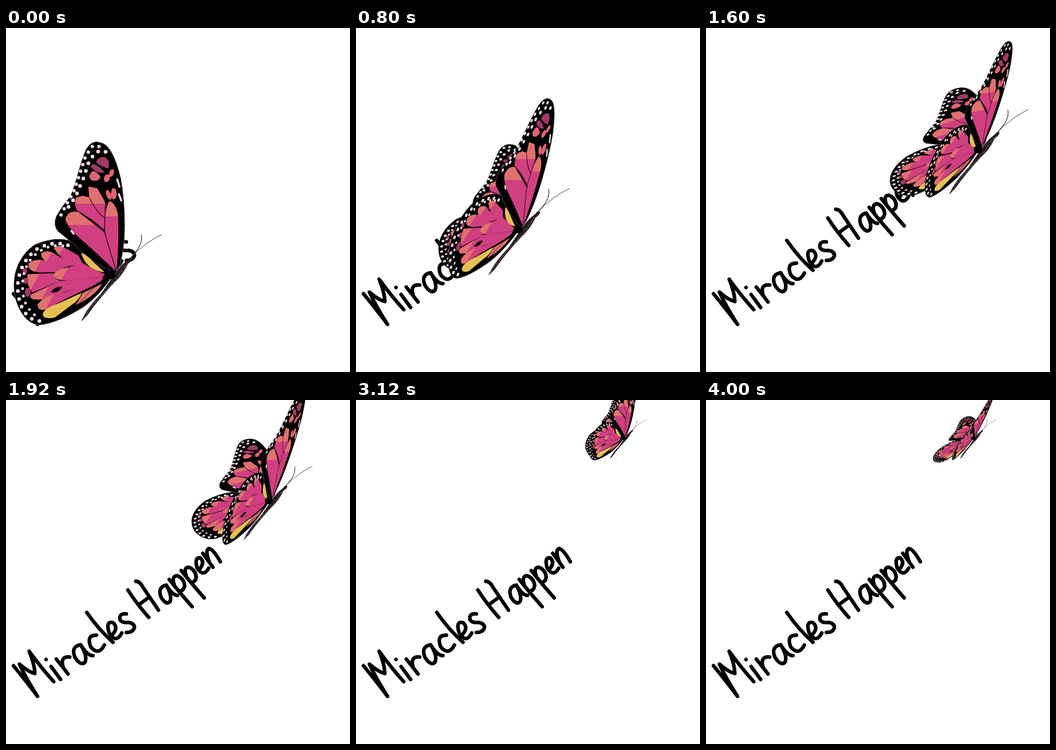
An HTML page with a canvas for the animation above (4.08 s loop, 600 by 600 pixels).

```html
<!DOCTYPE html>
<html lang="en">
<head>
<meta charset="utf-8">
<title>Miracles Happen</title>
<style>
html, body { margin: 0; width: 100%; height: 100%; overflow: hidden; background: #fff; }
canvas { display: block; width: 600px; height: 600px; }
</style>
</head>
<body>
<canvas id="stage" width="600" height="600" role="img" aria-label="Miracles Happen"></canvas>
<script>
const ctx = document.getElementById('stage').getContext('2d');
const LOOP = 4080, STEP = 80, BEAT = 28;
const PINK = '#d03f80', SALMON = '#e0706f', YELLOW = '#e5c153', PLUM = '#a03a68', PALE = '#f0dbe4';

// Handwritten strokes along the baseline: [time shown, path]
const letters = [
  [0, 'M-2-68Q0-30 0 0Q3-40 8-64Q13-42 20-35Q29-48 35-72Q35-35 38-4'],
  [0, 'M50-28V0M50-43h.1'],
  [0, 'M65-33Q66-14 66 0M66-14Q73-34 86-22'],
  [0, 'M114-28Q98-36 93-16Q92 3 102 1Q112-4 114-28Q112-6 120 0'],
  [0, 'M146-25Q132-36 126-15Q127 7 147-3'],
  [0, 'M156-67Q155-30 162 2'],
  [0, 'M167-9Q186-12 182-26Q173-36 166-14Q165 8 184-2'],
  [0, 'M210-24Q200-33 195-22Q195-15 204-10Q212-2 207 4Q199 9 191 2'],
  [880, 'M237-56Q235-30 238 4M257-60Q263-56 261-44L259 4M238-24H260'],
  [960, 'M296-23Q281-30 276-11Q275 6 284 4Q293-1 296-23Q294-3 301 3'],
  [1200, 'M306-28Q307 0 310 34M307-14Q312-31 321-25Q328-14 321-3Q314 3 308-1'],
  [1280, 'M332-28Q333 0 336 34M333-14Q338-31 346-25Q353-14 346-3Q340 3 334-1'],
  [1280, 'M358-11Q374-14 372-26Q364-34 357-15Q356 5 373-3'],
  [1360, 'M380-30V0M380-10Q386-33 394-30Q399-25 396 0']
].map(([from, d]) => ({ from, path: new Path2D(d) }));

// time, wing root x, y, size
const flight = [
  [0, 185, 430, 1], [560, 272, 380, 1], [800, 285, 350, 1], [1120, 355, 279, 1],
  [1280, 383, 262, 1], [1680, 500, 198, .97], [1920, 460, 175, .85],
  [2240, 463, 119, .72], [2560, 465, 92, .56], [2800, 467, 66, .45], [LOOP, 467, 66, .45]
];

// Beat step, then where fore wing apex and hind wing corner point: near pair, far pair
const REST = [-30, -232, -172, 35];
const poses = [
  [0, ...REST, ...REST],
  [4, 48, -225, -96, 36, -60, -115, -163, 58],
  [10, 47, -228, -124, 35, -23, -147, -142, 45],
  [14, ...REST, ...REST],
  [16, 9, -248, -130, 30, -58, -165, -161, 28],
  [22, 71, -165, -78, 55, -40, -78, -158, 89],
  [24, 66, -227, -93, 41, -52, -125, -159, 59],
  [BEAT, ...REST, ...REST]
];

function sample(keys, at) {
  let i = 1;
  while (i < keys.length - 1 && keys[i][0] < at) i++;
  const a = keys[i - 1], b = keys[i], k = (at - a[0]) / (b[0] - a[0]);
  return a.slice(1).map((v, n) => v + (b[n + 1] - v) * k);
}

function fill(d, color) {
  ctx.fillStyle = color;
  ctx.fill(new Path2D(d));
}

function stroke(d, color, width, dash = []) {
  ctx.strokeStyle = color;
  ctx.lineWidth = width;
  ctx.setLineDash(dash);
  ctx.stroke(new Path2D(d));
  ctx.setLineDash([]);
}

// Salmon before the edge point, pink after it, along direction (dx, dy)
function cell(d, x, y, dx = 1, dy = .55) {
  const g = ctx.createLinearGradient(x, y, x + dx, y + dy);
  g.addColorStop(0, SALMON);
  g.addColorStop(1, PINK);
  fill(d, g);
  stroke(d, g, 1);
}

function spot(x, y, rx, ry, color, turn = 0) {
  ctx.beginPath();
  ctx.ellipse(x, y, rx, ry, turn, 0, 7);
  ctx.fillStyle = color;
  ctx.fill();
}

function hindWing() {
  const edge = 'M187 428Q150 382 112 371Q85 363 50 378Q24 396 16 428Q10 460 21 485Q35 516 58 518Q90 515 136 486Q165 465 187 430Z';
  fill(edge, '#000');
  stroke(edge, '#777', .7);
  cell('M84 384Q93 376 106 386L126 397L133 410L119 414Q97 405 84 384Z', 95, 389);
  cell('M62 393Q74 385 89 397L117 413L103 417L78 411Q60 404 62 393Z', 75, 399);
  cell('M40 411Q49 402 67 406L101 418L90 425L60 426Q37 425 40 411Z', 55, 415);
  cell('M38 430L81 428Q82 437 94 441L46 461Q35 447 38 430Z', 52, 439);
  cell('M82 430Q92 420 108 418L132 410L172 430L168 434L108 440Q84 440 82 430Z', 101, 430);
  cell('M44 465L94 442L170 435L164 442L105 459L70 473L48 473Q40 470 44 465Z', 70, 458);
  cell('M56 482Q66 466 101 462L168 439L152 449L110 469L68 491Q54 493 56 482Z', 75, 479);
  fill('M131 392Q141 395 148 404L172 426Q139 422 131 392Z', YELLOW);
  fill('M64 500Q65 489 90 481L132 462Q128 475 113 484L85 505Q66 509 64 500Z', YELLOW);
  fill('M134 462L168 446Q155 468 122 483Z', SALMON);
  fill('M78 461Q86 450 98 451Q93 463 78 461Z', '#000');
  stroke('M152 454L126 482', '#4a1830', 1);
  spot(33, 424, 4, 5, PLUM);
  spot(34, 441, 5, 5, PLUM);
  spot(38, 461, 5, 8, PLUM);
  stroke('M108 379Q83 370 55 385Q30 402 22 436Q17 462 28 488Q40 511 60 511', PALE, 6.5, [0, 14]);
  stroke('M99 380Q70 376 46 400Q30 420 29 444Q28 475 39 488Q48 504 58 502', PALE, 5, [0, 13]);
}

function foreWing() {
  const edge = 'M190 428Q145 406 116 375L90 354Q82 343 88 328Q99 309 112 294C122 274 128 238 140 211Q151 194 165 200C184 204 194 238 200 262Q207 300 207 345Q207 385 198 415Z';
  fill(edge, '#000');
  stroke(edge, '#777', .7);
  cell('M192 424L140 376Q107 349 104 333Q108 318 126 321L150 338L172 356Q178 390 192 424Z', 0, 343, 0, 1);
  cell('M123 296L133 293L146 296L144 277L159 280L171 301L174 312L172 352Q149 331 124 318Q118 307 123 296Z', 0, 306, 0, 1);
  cell('M173 350Q173 311 181 302Q193 308 195 328Q197 380 192 424Q177 390 173 350Z', 0, 328, 0, 1);
  stroke('M146 297Q159 323 172 331M172 352L173 311M172 356L192 424M126 320L172 356', '#2b0b1a', 1.4);
  fill('M157 234Q162 222 174 226Q182 233 179 245Q165 242 157 234Z', PLUM);
  fill('M148 242Q153 230 172 252Q158 255 148 242Z', PLUM);
  fill('M145 259Q151 240 165 260Q160 270 148 265Z', '#dd6470');
  spot(176, 262, 5, 7, '#dd6470', .3);
  spot(184, 253, 4, 7, '#dd6470', .4);
  spot(179, 291, 4, 9, '#dd6470', -.4);
  spot(188, 289, 5, 10, '#dd6470');
  stroke('M96 326L108 303L118 286L129 253L139 223L151 206L166 207', PALE, 6, [0, 12]);
  stroke('M109 312L121 295L135 262L145 232L157 216L172 214L180 224', PALE, 6.5, [0, 14]);
  stroke('M194 264L198 277M197 290L201 301M114 354L118 359', PALE, 3.5);
}

function wings([ax, ay, lx, ly]) {
  const [rx, ry, sx, sy] = REST, det = rx * sy - sx * ry;
  ctx.save();
  ctx.transform(
    (ax * sy - lx * ry) / det, (ay * sy - ly * ry) / det,
    (lx * rx - ax * sx) / det, (ly * rx - ay * sx) / det, 0, 0);
  ctx.translate(-185, -430);
  hindWing();
  foreWing();
  ctx.restore();
}

function body() {
  ctx.save();
  ctx.translate(-185, -430);
  stroke('M219 399Q240 377 236 361', '#453b40', 1.3);
  stroke('M219 399Q243 374 272 360', '#453b40', 1);
  fill('M131 512Q139 491 166 463L188 431Q199 414 213 404Q217 398 221 400Q222 405 213 411Q203 432 188 445Q160 475 142 501Z', '#2a2024');
  stroke('M135 506Q155 475 190 442L211 411', '#6b505c', 1.2, [5, 3]);
  spot(183, 431, 8, 7, '#000');
  ctx.restore();
}

function lettering(t) {
  ctx.save();
  ctx.translate(55, 517);
  ctx.rotate(-.635);
  ctx.strokeStyle = '#000';
  ctx.lineWidth = 6.3;
  for (const { from, path } of letters) if (t >= from) ctx.stroke(path);
  ctx.restore();
}

function draw(t) {
  const [x, y, size] = sample(flight, t);
  const pose = sample(poses, t / STEP % BEAT);
  ctx.fillStyle = '#fff';
  ctx.fillRect(0, 0, 600, 600);
  ctx.lineCap = ctx.lineJoin = 'round';
  lettering(t);
  ctx.save();
  ctx.translate(x, y);
  ctx.scale(size, size);
  wings(pose.slice(4));
  wings(pose.slice(0, 4));
  body();
  ctx.restore();
}

const start = performance.now();
function tick() {
  const t = (performance.now() - start) % LOOP;
  draw(Math.floor(t / STEP) * STEP);
  requestAnimationFrame(tick);
}
tick();
</script>
</body>
</html>
```
